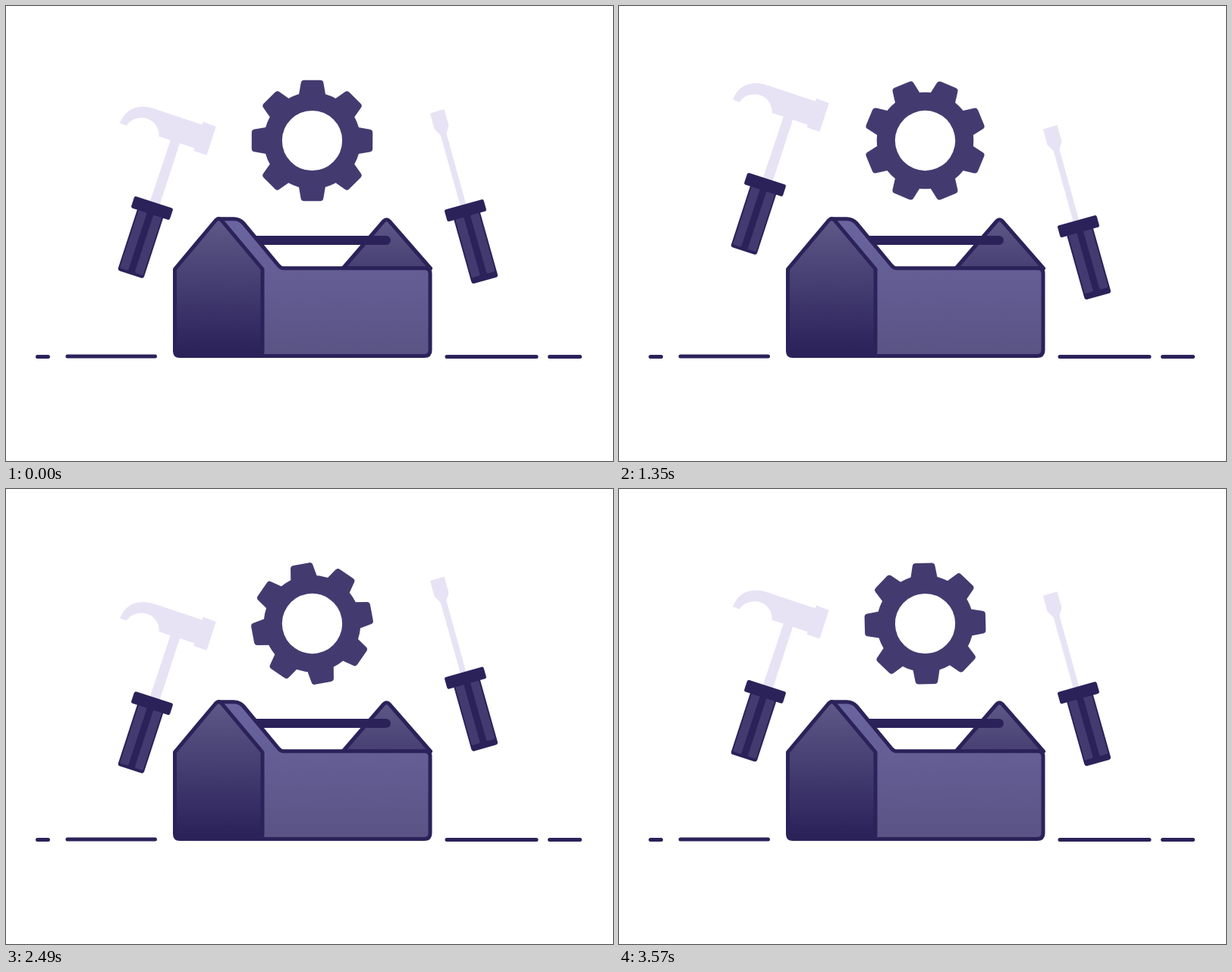
Animation, 800 px wide and 600 px high, one loop 3600 ms. Source, as an HTML page:

```html
<!DOCTYPE html>
<html lang="en">
<head>
<meta charset="utf-8">
<title>Toolbox</title>
<style>
  html, body { margin: 0; width: 100%; height: 100%; overflow: hidden; background: #fff; }
  svg { display: block; width: 800px; height: 600px; }
  .dark { fill: #2b225a; }
  .mid { fill: #433b70; }
  .pale { fill: #e7e3f5; }
  .line { stroke: #2b225a; stroke-width: 5; stroke-linejoin: round; stroke-linecap: round; }
</style>
</head>
<body>
<svg viewBox="0 0 800 600">
  <defs>
    <linearGradient id="side" gradientUnits="userSpaceOnUse" x1="0" y1="280" x2="0" y2="456">
      <stop stop-color="#5e5988"/><stop offset="1" stop-color="#2b225a"/>
    </linearGradient>
    <linearGradient id="front" gradientUnits="userSpaceOnUse" x1="0" y1="280" x2="0" y2="462">
      <stop stop-color="#6a65a0"/><stop offset="1" stop-color="#5a5384"/>
    </linearGradient>
    <linearGradient id="back" gradientUnits="userSpaceOnUse" x1="0" y1="280" x2="0" y2="346">
      <stop stop-color="#5e5988"/><stop offset="1" stop-color="#473f72"/>
    </linearGradient>
    <path id="tooth" d="M-18 -58L-14.9 -76Q-14.4 -79.7 -10.5 -79.7H10.5Q14.4 -79.7 14.9 -76L18 -58Z"/>
    <g id="panels" class="mid">
      <rect x="-16" y="6" width="11.5" height="82" rx="2"/>
      <rect x="4.5" y="6" width="11.5" height="82" rx="2"/>
    </g>
    <rect id="collar" class="dark" x="-26.8" y="-8.1" width="53.6" height="16.2" rx="2.5"/>
  </defs>

  <g class="line" fill="none">
    <path d="M41.5 462.5H55.5M81 462H196.5M581 462.5H699M716.5 462.5H756.5"/>
  </g>

  <g class="line">
    <path fill="url(#back)" d="M444 346L497.5 284Q501.5 279.5 505.5 284L559.5 346Z"/>
    <path d="M328 309H501" stroke-width="12" style="stroke-width:12"/>
    <path fill="url(#front)" d="M280 280.7H300Q308 280.7 313 286.500L359 342Q362 345.800 366 345.800H552Q559 345.800 559 353V454Q559 461.500 551 461.500H330Z"/>
    <path fill="url(#side)" d="M222.500 347L276.500 282.500Q280.300 278.800 284 282.500L338 347V456Q338 461.500 332 461.500H229Q222.500 461.500 222.500 455Z"/>
  </g>

  <g id="gear" class="mid">
    <circle r="51.600" fill="none" stroke="#433b70" stroke-width="24"/>
  </g>

  <g id="hammer">
    <path class="pale" d="M150 154.500C157 137 172 128.500 194 135L258.500 156.500L260 152.700L276.700 159L264.500 196.700L247.500 191L248.500 187.500L229 181L202 264L189 260L216.800 177L201.500 172C203 160 193 147.500 179 147.500C170 147.500 163 151 159 157.700Z"/>
    <g transform="translate(192.500 266.500) rotate(18)">
      <rect class="dark" x="-18" width="36" height="92" rx="3.500"/>
      <use href="#panels"/>
      <use href="#collar"/>
    </g>
  </g>

  <g id="driver">
    <path class="pale" d="M559 141.500L577.500 136L583.500 157.500L580.500 168L607 264L599.500 266L572.800 170.500L564.500 162Z"/>
    <g transform="translate(605.500 269.500) rotate(-15.700)">
      <rect class="dark" x="-18" width="36" height="96" rx="3.500"/>
      <use href="#panels"/>
      <use href="#collar"/>
    </g>
  </g>
</svg>
<script>
  const LOOP = 3600;
  const byId = id => document.getElementById(id);
  const gear = byId('gear'), hammer = byId('hammer'), driver = byId('driver');

  for (let i = 0; i < 8; i++) {
    const tooth = document.createElementNS('http://www.w3.org/2000/svg', 'use');
    tooth.setAttribute('href', '#tooth');
    tooth.setAttribute('transform', `rotate(${i * 45})`);
    gear.append(tooth);
  }

  const easeIn = u => u * u * (2 - u);
  const easeInOut = u => u * u * (3 - 2 * u);

  // Vertical drift: rest -> first peak -> second peak -> rest
  function bob(t, t1, y1, t2, y2) {
    if (t < t1) return y1 * (1 - easeIn(1 - t / t1));
    if (t < t2) return y1 + (y2 - y1) * easeInOut((t - t1) / (t2 - t1));
    return y2 * (1 - easeIn((t - t2) / (LOOP - t2)));
  }

  function draw() {
    const t = performance.now() % LOOP;
    gear.setAttribute('transform', `translate(403.5 177.5) rotate(${t / LOOP * 180})`);
    hammer.setAttribute('transform', `translate(0 ${bob(t, 1200, -32.3, 2790, 21)})`);
    driver.setAttribute('transform', `translate(0 ${bob(t, 1170, 22.7, 2745, -23.6)})`);
    requestAnimationFrame(draw);
  }
  draw();
</script>
</body>
</html>
```
